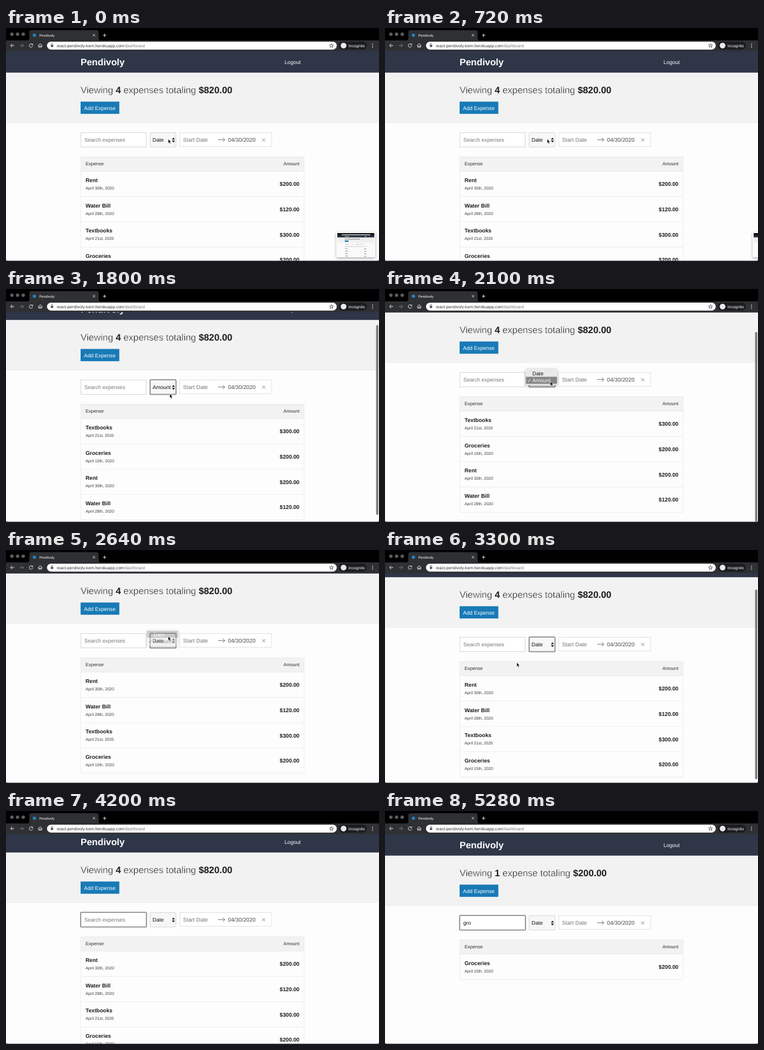
Write an HTML page that moves like this. It is 600x375 px and loops after 5.34 s.

```html
<!DOCTYPE html>
<html lang="en">
<head>
<meta charset="utf-8">
<title>Pendivoly</title>
<style>
html, body { margin: 0; width: 100%; height: 100%; overflow: hidden; background: #fdfdfd; }
svg { display: block; width: 100%; height: 100%; }
text { font-family: "Liberation Sans", Arial, sans-serif; text-rendering: geometricPrecision; fill: #333; white-space: pre; }
.bold { font-weight: bold; fill: #1c1c1c; stroke: none; }
.end { text-anchor: end; }
.h1 { font-size: 15px; }
.light { fill: #2a2a2a; stroke: #f2f2f2; stroke-width: .35; }
.h3 { font-size: 8.775px; }
.ui { font-size: 8.5px; }
.pick { font-size: 8.9px; }
.th { font-size: 7.5px; }
.sub { font-size: 6.56px; fill: #3c3c3c; }
.white { fill: #fff; }
.ink { fill: #111; }
.soft { fill: #757575; }
.icon { fill: none; stroke: #d8d8d8; stroke-width: 1; }
.box { fill: #fff; stroke: #cfd0d1; stroke-width: .8; }
.line { fill: none; stroke: #e8e8e8; stroke-width: .7; }
.focus { fill: none; stroke: #949494; stroke-width: 1.8; }
</style>
</head>
<body>
<svg viewBox="0 0 600 375">
  <defs>
    <clipPath id="view"><rect y="37" width="600" height="338"/></clipPath>
    <filter id="shade" x="-30%" y="-30%" width="160%" height="180%">
      <feDropShadow dx="0" dy="1.5" stdDeviation="2" flood-opacity=".35"/>
    </filter>
  </defs>
  <rect width="600" height="375" fill="#fdfdfd"/>

  <g clip-path="url(#view)">
    <g id="page">
      <rect y="72" width="600" height="80.6" fill="#f2f2f2"/>
      <rect y="30" width="600" height="41.8" fill="#2e3648"/>
      <text class="h1 bold white" x="120" y="60">Pendivoly</text>
      <text class="ui white" x="448" y="58">Logout</text>
      <path d="M0 152.5H600" stroke="#ececec" stroke-width=".6"/>
      <text class="h1 light" id="sum" x="120" y="104.5"></text>
      <rect x="120" y="118.5" width="62.3" height="19.7" fill="#187ab6"/>
      <text class="ui white" x="125.6" y="131.6">Add Expense</text>

      <rect class="box" x="120.4" y="168.4" width="105.2" height="23.2"/>
      <rect class="focus" id="findRing" x="120.1" y="168.1" width="105.8" height="23.6" rx="1"/>
      <text class="ui" id="find" x="126" y="183.3"></text>
      <path id="caret" d="M138.7 175.5V185" stroke="#111" stroke-width=".6"/>

      <rect class="box" x="231.9" y="168.4" width="41.4" height="23.2" rx="1" style="fill:#f7f7f7"/>
      <rect class="focus" id="sortRing" x="231.8" y="168.2" width="41.7" height="23.5" rx="1"/>
      <text class="ui ink" id="sort" x="235.8" y="183.3"></text>
      <path class="ink" d="M266.9 179.4L269.3 176.4L271.7 179.4ZM266.9 181.3H271.7L269.3 184.3Z"/>

      <rect class="box" x="279.4" y="168.6" width="147.8" height="21.8" style="stroke:#dcdcdc"/>
      <text class="pick soft" x="284.8" y="183.2">Start Date</text>
      <path class="icon" d="M341 179.8H352M348.8 176.6L352 179.8L348.8 183" style="stroke:#555;stroke-width:.8"/>
      <text class="pick" x="357" y="183.2" style="fill:#484848">04/30/2020</text>
      <path class="icon" d="M412 177.5L417 182.5M417 177.5L412 182.5" style="stroke:#707070;stroke-width:.8"/>

      <rect class="line" x="120.4" y="207.3" width="359.2" height="23.3" style="fill:#f2f2f2"/>
      <text class="th" x="128" y="221.1">Expense</text>
      <text class="th end" x="472" y="221.1">Amount</text>
      <g id="rows"></g>
    </g>
    <rect id="bar" x="595.3" width="3.6" height="305.5" rx="1.8" fill="#7d7d7d"/>
    <path d="M0 374.6H600" stroke="#777" stroke-width=".8"/>
    <path d="M0 372V375H3Q0 375 0 372M600 372V375H597Q600 375 600 372" fill="#333"/>
  </g>

  <g id="menu">
    <rect x="226.7" width="50" height="26.6" rx="2.4" fill="#e9e9e9" filter="url(#shade)"/>
    <rect id="hot" x="226.7" width="50" height="11.3" fill="#858585"/>
    <path class="icon" id="tick" d="M229.8 .4L231.2 2L233.8 -2.2" style="stroke-width:.8"/>
    <text class="ui" id="opt0" x="237" y="10.7">Date</text>
    <text class="ui" id="opt1" x="237" y="22">Amount</text>
  </g>

  <g id="shot">
    <rect x="531.5" y="328.5" width="62.5" height="40.5" rx="2" fill="#fafafa" filter="url(#shade)"/>
    <rect x="533" y="330" width="59.5" height="4" fill="#161616"/>
    <rect x="540" y="332.2" width="46" height="1.2" fill="#eee"/>
    <rect x="533" y="334" width="59.5" height="3.3" fill="#2e3648"/>
    <rect x="533" y="337.3" width="59.5" height="8" fill="#efefef"/>
    <path d="M545 335.6H552M577 335.6H580" stroke="#ddd" stroke-width=".8"/>
    <path d="M545 339.8H569" stroke="#777" stroke-width=".9"/>
    <rect x="545" y="342" width="6" height="2" fill="#187ab6"/>
    <path d="M545 348H552M556 348H559M562 348H575M545 351.8H580" stroke="#bbb" stroke-width=".7"/>
    <path d="M545.5 355H549.5M545.5 359H550.5M545.5 363H550M545.5 367H550M576 355.6H579.5M576 359.6H579.5M576 363.6H579.5M576 367.4H579.5" stroke="#777" stroke-width=".8"/>
  </g>

  <g id="chrome">
    <rect width="600" height="20" fill="#000"/>
    <rect y="20" width="600" height="17.3" fill="#2f3033"/>
    <g fill="#5c5c5e"><circle cx="9.5" cy="10" r="2.8"/><circle cx="18.6" cy="10" r="2.8"/><circle cx="27.7" cy="10" r="2.8"/></g>
    <path d="M34 20Q37.5 20 37.5 17V7Q37.5 3.5 41 3.5H145.5Q149 3.5 149 7V17Q149 20 152 20Z" fill="#2f3033"/>
    <circle cx="45.7" cy="11.6" r="2.7" fill="#2680c0"/>
    <text class="white" x="53.5" y="13.7" font-size="5.65">Pendivoly</text>
    <path class="icon" d="M139.7 9.8L143.3 13.4M143.3 9.8L139.7 13.4M156 11.7H161.2M158.6 9.1V14.3"/>
    <path class="icon" d="M13.2 28.2H7.4M10 25.4L7.2 28.2L10 31"/>
    <path class="icon" d="M22.3 28.2H28.1M25.5 25.4L28.3 28.2L25.5 31" style="stroke:#77787a"/>
    <path class="icon" d="M42.3 26.3A2.8 2.8 0 1 0 43 28.7M43 25V27H40.8"/>
    <path class="icon" d="M51.6 28.3L55 25.2L58.4 28.3M52.7 27.8V31H54.2V29H55.8V31H57.3V27.8"/>
    <rect x="66" y="21.9" width="466" height="12.8" rx="6.4" fill="#fff"/>
    <rect x="72" y="27.2" width="4" height="3.3" rx=".4" fill="#555"/>
    <path class="icon" d="M72.8 27.3V26A1.2 1.2 0 0 1 75.2 26V27.3" style="stroke:#555;stroke-width:.7"/>
    <text x="81.5" y="30.5" font-size="6.7" fill="#222">react-pendivoly-kem.herokuapp.com<tspan fill="#777">/dashboard</tspan></text>
    <path class="icon" id="star" style="stroke:#444;stroke-width:.8"/>
    <rect x="535.5" y="21.9" width="45" height="12.8" rx="6.4" fill="#1b1c1f"/>
    <circle cx="543" cy="28.3" r="4.6" fill="#e8e8e8"/>
    <text class="white" x="551" y="30.6" font-size="6.5">Incognito</text>
    <g fill="#d8d8d8"><circle cx="589.6" cy="25.7" r=".8"/><circle cx="589.6" cy="28.3" r=".8"/><circle cx="589.6" cy="30.9" r=".8"/></g>
  </g>

  <g id="mouse">
    <path id="arrow" d="M0 0V6.7L1.5 5.3L2.6 7.9L3.7 7.4L2.6 4.9H4.7Z" fill="#000" stroke="#fff" stroke-width=".5"/>
    <path id="beam" d="M-1.6 -3.3Q0 -3.3 0 -2.5Q0 -3.3 1.6 -3.3M0 -2.5V3M-1.6 3.8Q0 3.8 0 3Q0 3.8 1.6 3.8M-.8 1.5H.8" fill="none" stroke="#222" stroke-width=".8"/>
  </g>
</svg>
<script>
const LOOP = 5340, STEP = 60, ROW = 40.7;
const $ = id => document.getElementById(id);
const show = (id, on) => $(id).setAttribute('opacity', +on);
const move = (id, x, y) => $(id).setAttribute('transform', `translate(${x} ${y})`);
const within = (t, a, b) => t >= a && t < b;

const items = [
  ['Rent', 'April 30th, 2020', 200],
  ['Water Bill', 'April 28th, 2020', 120],
  ['Textbooks', 'April 21st, 2020', 300],
  ['Groceries', 'April 15th, 2020', 200]
];
const orders = { Date: [0, 1, 2, 3], Amount: [2, 3, 0, 1] };

// [time, value] stops, joined linearly
const scrollStops = [[1500, 0], [1560, 2], [1620, 6], [1800, 22], [1920, 31], [2040, 34],
  [3240, 34], [3300, 28], [3360, 20], [3420, 13], [3480, 8], [3540, 5]];
const mouseX = [[1620, 261], [1980, 266], [2220, 266], [2460, 261], [2940, 261], [3120, 212]];
const mouseY = [[1020, 178.7], [1140, 188.7], [1620, 188.7], [1980, 149], [2220, 149], [2460, 139], [2940, 139], [3120, 181]];
const barStops = [[1500, 0], [1620, 1], [2340, 1], [2580, 0], [3180, 0], [3300, 1], [3780, 1], [3900, 0]];

function track(stops, t) {
  const i = stops.findIndex(s => s[0] > t);
  if (i < 0) return stops[stops.length - 1][1];
  if (!i) return stops[0][1];
  const [a, u] = stops[i - 1], [b, v] = stops[i];
  return u + (v - u) * (t - a) / (b - a);
}

const money = n => '$' + n.toFixed(2);

function rowMarkup(item, i) {
  const y = 230.6 + i * ROW;
  return `<path class="line" d="M120.4 ${y}v${ROW}h359.2v${-ROW}"/>
    <text class="h3 bold" x="128" y="${y + 17.2}">${item[0]}</text>
    <text class="sub" x="128" y="${y + 29.2}">${item[1]}</text>
    <text class="h3 bold end" x="472" y="${y + 23.6}">${money(item[2])}</text>`;
}

let lastKey = '';
function fill(sort, query) {
  if (lastKey === sort + query) return;
  lastKey = sort + query;
  const list = orders[sort].map(i => items[i]).filter(r => r[0].toLowerCase().includes(query));
  const total = list.reduce((n, r) => n + r[2], 0);
  const bold = s => `<tspan class="bold">${s}</tspan>`;
  $('sum').innerHTML = `Viewing ${bold(list.length)} expense${list.length > 1 ? 's' : ''} totaling ${bold(money(total))}`;
  $('rows').innerHTML = list.map(rowMarkup).join('');
  $('sort').textContent = sort;
  $('find').textContent = query || 'Search expenses';
  $('find').setAttribute('class', query ? 'ui ink' : 'ui soft');
}

function drawMenu(t, y) {
  const first = t < 1500;
  const top = first ? 173 : 128;
  const hot = y > top + 13.2 ? 1 : 0;
  const chosen = first ? 0 : 1;
  const open = within(t, 840, 1200) || within(t, 2100, 2640);
  const closing = within(t, 1200, 1260) || within(t, 2640, 2700);
  show('menu', open ? 1 : closing ? .4 : 0);
  move('menu', 0, top);
  $('hot').setAttribute('y', 2 + hot * 11.3);
  [0, 1].forEach(i => { $('opt' + i).style.fill = i === hot ? '#fff' : '#111'; });
  move('tick', 0, 7.8 + chosen * 11.3);
  $('tick').style.stroke = chosen === hot ? '#fff' : '#222';
}

function draw(t) {
  const query = 'gro'.slice(0, t < 4260 ? 0 : t < 4440 ? 1 : t < 4620 ? 2 : 3);
  const scroll = query ? 0 : track(scrollStops, t);
  const x = track(mouseX, t), y = track(mouseY, t);
  fill(within(t, 1200, 2640) ? 'Amount' : 'Date', query);
  move('page', 0, -scroll);
  $('bar').setAttribute('y', 38 + scroll * .914);
  show('bar', track(barStops, t));
  show('sortRing', within(t, 1200, 4080));
  show('findRing', t >= 4080);
  show('caret', within(t, 4620, 4800) || within(t, 4980, 5280));
  drawMenu(t, y);

  const overField = x < 226 && y < 192 - scroll;
  show('mouse', t < 4140);
  show('arrow', !overField);
  show('beam', overField);
  move('mouse', x, y);

  const p = Math.min(1, Math.max(0, (t - 240) / 540));
  move('shot', 76 * p * p, 0);
  show('shot', p < 1);
}

$('star').setAttribute('d', 'M' + Array.from({ length: 10 }, (_, i) => {
  const a = i * Math.PI / 5, r = i % 2 ? 1.5 : 3.4;
  return (523.6 + r * Math.sin(a)).toFixed(2) + ' ' + (28.4 - r * Math.cos(a)).toFixed(2);
}).join('L') + 'Z');

const start = performance.now();
function tick() {
  const t = (performance.now() - start) % LOOP;
  draw(Math.floor(t / STEP) * STEP);
  requestAnimationFrame(tick);
}
tick();
</script>
</body>
</html>
```
